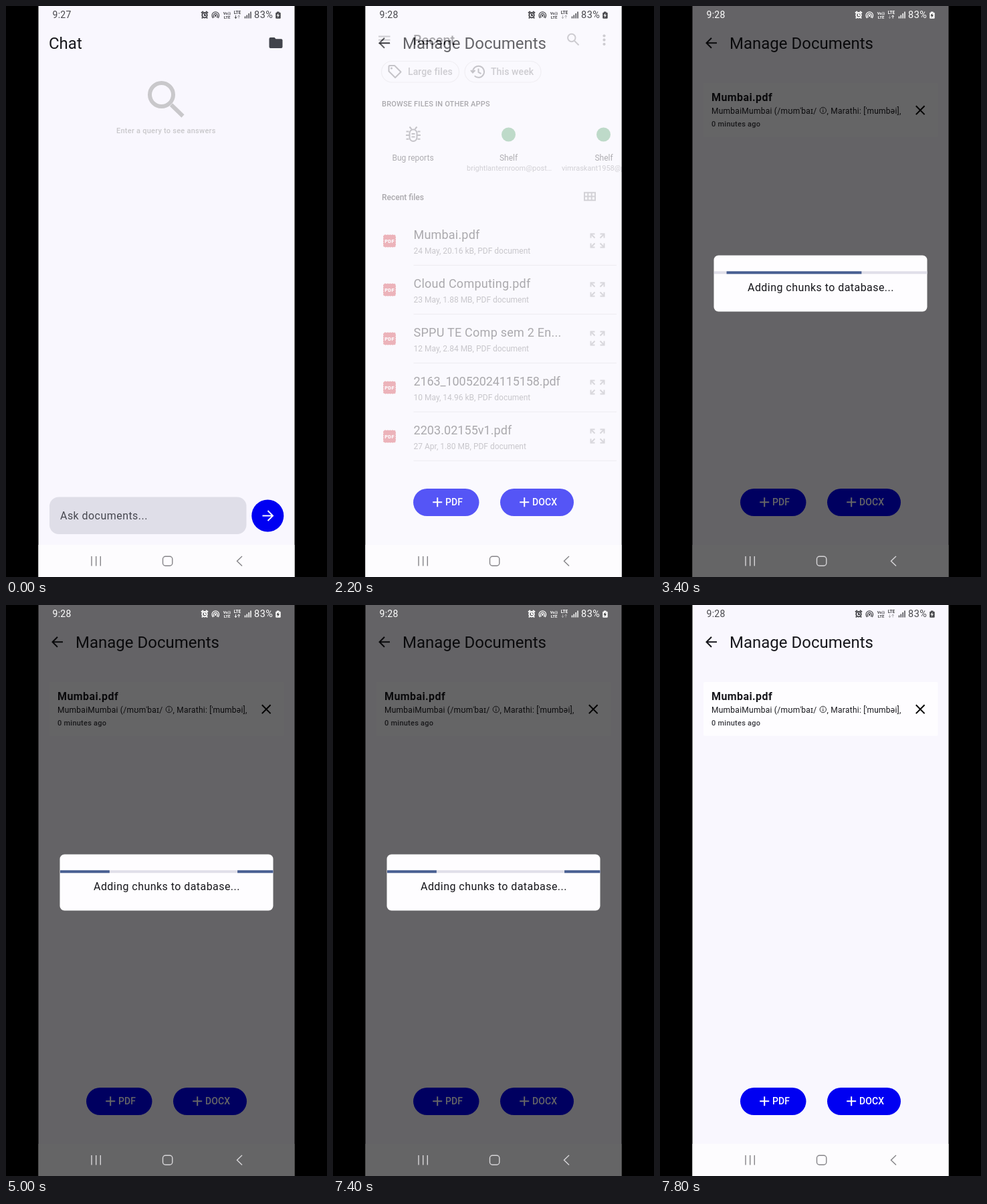
An HTML page that plays this animation: 480 by 853 pixels, repeating every 8000 ms.

```html
<!DOCTYPE html>
<html lang="en">
<head>
<meta charset="utf-8">
<title>Document chat</title>
<style>
html, body { margin: 0; width: 100%; height: 100%; overflow: hidden; background: #000; }
svg { display: block; width: 480px; height: 853px; font-family: Roboto, sans-serif; }
text { white-space: pre; }
.m { font-weight: 500; }
.line { fill: none; stroke: currentColor; stroke-width: 2; }
.mid { text-anchor: middle; }
</style>
</head>
<body>
<svg viewBox="0 0 480 853">
  <defs>
    <clipPath id="screen"><rect x="48.5" width="383" height="853"/></clipPath>
    <clipPath id="pill"><rect x="120" y="721" width="98.500" height="41" rx="20.500"/></clipPath>
    <g id="expand">
      <path d="M-10-4v-6h6M4-10h6v6M10 4v6h-6M-4 10h-6v-6" class="line"/>
      <path d="M-9-9l5 5M9-9l-5 5M9 9l-5-5M-9 9l5-5" class="line"/>
    </g>
    <g id="pdf">
      <rect x="-9" y="-9" width="18" height="18" rx="2" fill="#d32f36"/>
      <rect x="-9" y="-9" width="18" height="18" rx="2" fill="none" stroke="#d32f36" stroke-dasharray="2 1.500"/>
      <text class="mid" y="3" font-size="7.500" font-weight="900" fill="#fff" letter-spacing=".3">PDF</text>
    </g>
  </defs>

  <g clip-path="url(#screen)">
    <rect x="48" width="384" height="853" fill="#f9f7fe"/>
    <rect x="48" y="805" width="384" height="48" fill="#fdfcfe"/>

    <g id="chat">
      <text x="64" y="63.500" font-size="24" fill="#17171c">Chat</text>
      <circle id="folderRipple" cx="404" cy="55" fill="#44464f"/>
      <path d="M393.500 49q0-2 2-2h6l2 2.200h8q2 0 2 2v9.800q0 2-2 2h-16q-2 0-2-2z" fill="#41434b"/>
      <g fill="none" stroke="#c9c8cb" stroke-width="6">
        <circle cx="232.500" cy="132.500" r="17.500"/>
        <path d="M247 147.500l17.500 17"/>
      </g>
      <text x="165" y="189.500" class="m" font-size="11" letter-spacing=".25" fill="#c9c8cb">Enter a query to see answers</text>
      <rect x="65" y="733.500" width="294.500" height="55.500" rx="14" fill="#dfdee8"/>
      <text x="81" y="767" font-size="16" letter-spacing=".45" fill="#474850">Ask documents...</text>
      <circle cx="391.300" cy="761.500" r="24" fill="#0000f2"/>
      <path d="M383.500 761.500h15M391.500 754l7.500 7.500-7.500 7.500" class="line" color="#fff"/>
    </g>

    <g id="manage">
      <path d="M85 55.300H70M77 47.800l-7.500 7.500 7.500 7.500" class="line" color="#17171c"/>
      <text x="104" y="63.500" font-size="24" fill="#17171c">Manage Documents</text>
      <g id="card" fill="#17171c">
        <rect x="65" y="115" width="350.500" height="80.500" rx="2" fill="#fefdff"/>
        <text x="77" y="142" font-size="16" font-weight="700" letter-spacing=".4">Mumbai.pdf</text>
        <g font-size="12" letter-spacing=".25">
          <text x="77" y="160.500">MumbaiMumbai (/mʊmˈbaɪ/</text>
          <text x="249.500" y="160.500">, Marathi: [ˈmumbəi],</text>
        </g>
        <circle cx="243.800" cy="156" r="4.700" fill="none" stroke="#17171c" stroke-width=".9"/>
        <path d="M243.800 153v1.200M243.800 155.300v3.500" stroke="#17171c"/>
        <text x="77" y="179.500" class="m" font-size="11" letter-spacing=".25" fill="#3c3c42">0 minutes ago</text>
        <path d="M382.800 149.300l12.800 12.800m0-12.800l-12.800 12.800" class="line"/>
      </g>
      <rect x="120" y="721" width="98.500" height="41" rx="20.500" fill="#0000f2"/>
      <rect x="250" y="721" width="110" height="41" rx="20.500" fill="#0000f2"/>
      <g clip-path="url(#pill)"><circle id="pdfRipple" cx="173" cy="738" fill="#fff"/></g>
      <path d="M149.200 741.300h14m-7-7v14M279.200 741.300h14m-7-7v14" class="line" color="#fff"/>
      <g class="m" font-size="14" letter-spacing=".1" fill="#fff">
        <text x="168" y="746.300">PDF</text>
        <text x="298" y="746.300">DOCX</text>
      </g>
      <circle id="touch" cx="173" cy="738" r="9.500" fill="#c4b4ff" opacity=".7"/>
    </g>

    <g id="picker">
      <rect x="48" width="384" height="853" fill="#fdfcfe"/>
      <g color="#77777a">
        <path d="M68 45.500h17.500M68 50.800h17.500M68 56h17.500" class="line" stroke-width="1.800"/>
        <circle cx="356.800" cy="47.500" r="5.700" class="line"/>
        <path d="M361 52l6.500 6.500" class="line"/>
        <g fill="currentColor"><circle cx="405.500" cy="44.500" r="2.100"/><circle cx="405.500" cy="50.700" r="2.100"/><circle cx="405.500" cy="57" r="2.100"/></g>
        <g fill="none" stroke="#dcdbde" stroke-width="1.200">
          <rect x="72.500" y="82.500" width="116" height="31.500" rx="15.700"/>
          <rect x="197" y="82.500" width="114" height="31.500" rx="15.700"/>
        </g>
        <g color="#606064">
          <path d="M83.500 90.500q0-1.500 1.500-1.500h7l9.500 9.500-8.500 8.500-9.500-9.500z" class="line" stroke-linejoin="round"/>
          <circle cx="87.500" cy="93" r="1.500" fill="currentColor"/>
          <path d="M209 98.300a8.500 8.500 0 1 1 2.600 6.100M206 96l3 3.500 3.500-3.500M217.500 93.500v5.300l4 2.300" class="line"/>
          <rect x="114.500" y="184.500" width="11" height="17.500" rx="5.500" class="line" stroke-width="2.400"/>
          <path d="M109.500 187.500h4M126.500 187.500h4M109 193h5M126 193h5M109.500 198.800h4M126.500 198.800h4M114.500 180.500l3 3.500M125.500 180.500l-3 3.500M117.500 191h5M117.500 195.500h5" class="line"/>
        </g>
        <path d="M376 278.800h16v11.500h-16zM376 284.500h16M381.300 279v11.500M386.700 279v11.500" class="line" stroke-width="1.500" color="#8a8a8d"/>
      </g>
      <text x="120" y="58" class="m" font-size="20" fill="#111">Recent</text>
      <g class="m" font-size="14" letter-spacing=".1" fill="#78787b">
        <text x="112" y="103">Large files</text>
        <text x="236" y="103">This week</text>
      </g>
      <text x="73" y="150" class="m" font-size="11" letter-spacing=".2" fill="#111">BROWSE FILES IN OTHER APPS</text>
      <circle cx="262.500" cy="192" r="10.500" fill="#4a9f62"/>
      <circle cx="404.500" cy="192" r="10.500" fill="#4a9f62"/>
      <g class="mid" font-size="12" fill="#1b1b1d">
        <text x="119.500" y="230.500">Bug reports</text>
        <text x="262.500" y="230.500">Shelf</text>
        <text x="405" y="230.500">Shelf</text>
      </g>
      <g font-size="11" fill="#828285">
        <text x="200" y="246">brightlanternroom@post…</text>
        <text x="342" y="246">vimraskant1958@post…</text>
      </g>
      <text x="73" y="289.500" class="m" font-size="12" fill="#111">Recent files</text>
      <g id="files"></g>
    </g>

    <g id="dialog">
      <rect id="dim" x="48" width="384" height="853" opacity=".6"/>
      <rect x="80.500" y="372.500" width="319" height="84" rx="7" fill="#fefdff"/>
      <rect x="81" y="396.300" width="318.500" height="4" fill="#e0dfe9"/>
      <g fill="#485f92">
        <rect id="bar1" y="396.300" height="4"/>
        <rect id="bar2" y="396.300" height="4"/>
      </g>
      <text x="131" y="425.500" font-size="16" letter-spacing=".45" fill="#17171c">Adding chunks to database...</text>
    </g>

    <g id="status" fill="currentColor">
      <text id="clock" x="69.500" y="18" font-size="14" letter-spacing=".3">9:27</text>
      <circle cx="297" cy="13.700" r="3.700" class="line"/>
      <path d="M292 10.500l3-2.500M302 10.500l-3-2.500M297 11.500v2.500h2M294 17l-1 1.500M300 17l1 1.500" class="line" stroke-width="1.400"/>
      <circle cx="313.300" cy="14.500" r="1.400"/>
      <path d="M311.500 17.300a3.200 3.200 0 1 1 3.600 0M309.700 18a5.300 5.300 0 1 1 7.200 0" class="line" style="stroke-width:1.200"/>
      <g class="mid" font-size="6" font-weight="700">
        <text x="330.500" y="12.500">Vo))</text>
        <text x="330.500" y="18.500">LTE</text>
        <text x="346" y="12.300" font-size="6.500">LTE</text>
      </g>
      <path id="down" d="M343.500 14v4.500m-1.800-1.800l1.800 1.800 1.800-1.800" class="line" style="stroke-width:1"/>
      <path id="up" d="M348.200 18.500v-4.500m-1.800 1.800l1.800-1.800 1.800 1.800" class="line" style="stroke-width:1"/>
      <path d="M357.500 18.500v-3M360.300 18.500v-5M363.200 18.500v-7.500M366 18.500v-10" class="line" style="stroke-width:1.500"/>
      <text x="371" y="18" font-size="14.500" letter-spacing=".5">83%</text>
      <path d="M405 8.500h3.500v1.200h1.200q1 0 1 1v7q0 1-1 1h-5.500q-1 0-1-1v-7q0-1 1-1h.8z"/>
      <path id="bolt" d="M407.500 10.500l-3 4h2l-.7 3.200 3.200-4.200h-2z"/>
    </g>
    <g id="nav" fill="none" stroke="currentColor" stroke-width="1.400">
      <path d="M128 822v14.500M134.700 822v14.500M141.300 822v14.500M353 822l-7.500 7.200 7.500 7.200"/>
      <rect x="234.500" y="822.300" width="14.300" height="14" rx="4"/>
    </g>
  </g>
</svg>

<script>
const LOOP = 8000;
const el = Object.fromEntries([...document.querySelectorAll('[id]')].map(n => [n.id, n]));
const set = (id, attrs) => { for (const k in attrs) el[id].setAttribute(k, attrs[k]); };
const show = (id, opacity) => { el[id].style.opacity = opacity; };
const ramp = (t, from, to) => Math.min(1, Math.max(0, (t - from) / (to - from)));

[
  ['Mumbai.pdf', '24 May, 20.16 kB', .2],
  ['Cloud Computing.pdf', '23 May, 1.88 MB', .25],
  ['SPPU TE Comp sem 2 En...', '12 May, 2.84 MB', .25],
  ['2163_10052024115158.pdf', '10 May, 14.96 kB', -.1],
  ['2203.02155v1.pdf', '27 Apr, 1.80 MB', .05]
].forEach(([name, info, spacing], i) => {
  el.files.innerHTML += `<g transform="translate(0 ${i * 73})">
    <use href="#pdf" x="84.500" y="351"/>
    <text x="120.500" y="348" font-size="18" letter-spacing="${spacing}" fill="#111">${name}</text>
    <text x="120.500" y="370" font-size="12" fill="#67676a">${info}, PDF document</text>
    <use href="#expand" x="395.500" y="350.500" color="#98989b"/>
    <path d="M120.500 387.300H424" stroke="#dbdade" stroke-width="1.300"/></g>`;
});

// Cubic bezier timing whose control points have y = 0 and y = 1 (or y2 given).
const bezier = (x1, x2) => x => {
  let lo = 0, hi = 1;
  for (let i = 0; i < 24; i++) {
    const p = (lo + hi) / 2, q = 1 - p;
    if (3 * q * q * p * x1 + 3 * q * p * p * x2 + p ** 3 < x) lo = p; else hi = p;
  }
  return lo * lo * (3 - 2 * lo);
};

// Each edge of the indeterminate progress bar: delay, duration, easing.
const edges = [
  [0, 750, bezier(.2, .8)], [333, 850, bezier(.4, 1)],
  [1000, 567, bezier(0, .65)], [1267, 533, bezier(.1, .45)]
];

function drawProgress(t) {
  const phase = (490 + 1.5 * (t - 3400) + 18000) % 1800;
  const [head1, tail1, head2, tail2] = edges.map(([delay, span, ease]) =>
    81 + 318.5 * ease(ramp(phase, delay, delay + span)));
  set('bar1', { x: tail1, width: Math.max(0, head1 - tail1) });
  set('bar2', { x: tail2, width: Math.max(0, head2 - tail2) });
}

// Start time, opacity of the down arrow, opacity of the up arrow.
const traffic = [[0, 1, .5], [1000, .4, .4], [3400, .4, 1], [4600, 1, 1], [5500, .4, .4]];

function draw(t) {
  const swap = ramp(t, 600, 1080);
  show('chat', 1 - swap);
  show('manage', swap);
  set('folderRipple', { r: 8 + 12 * ramp(t, 150, 350) });
  show('folderRipple', t < 150 ? 0 : .14 * (1 - ramp(t, 450, 700)));

  set('pdfRipple', { r: 20 + 24 * ramp(t, 1300, 1400) + 50 * ramp(t, 1400, 1600) });
  show('pdfRipple', t < 1300 ? 0 : .1 * (1 - ramp(t, 1550, 1780)));
  show('touch', t >= 1300 && t < 1550 ? .7 : 0);

  show('picker', t < 3400 ? ramp(t, 2100, 2400) : 0);
  show('card', t >= 3400 ? 1 : 0);
  show('dialog', t < 3400 ? 0 : 1 - ramp(t, 7620, 7760));
  drawProgress(t);

  const light = t >= 2250 && t < 7700;
  const picking = light && t < 3400;
  el.status.style.color = light ? '#fff' : '#48484c';
  el.bolt.style.fill = light ? '#222' : '#fff';
  el.nav.style.color = picking ? '#f0eef1' : light ? '#d6d5d8' : '#858488';
  el.clock.textContent = t < 800 ? '9:27' : '9:28';
  const [, down, up] = traffic.findLast(([start]) => t >= start);
  show('down', down);
  show('up', up);
}

const start = performance.now();
function tick(now) {
  draw(Math.max(0, now - start) % LOOP);
  requestAnimationFrame(tick);
}
draw(0);
requestAnimationFrame(tick);
</script>
</body>
</html>
```
